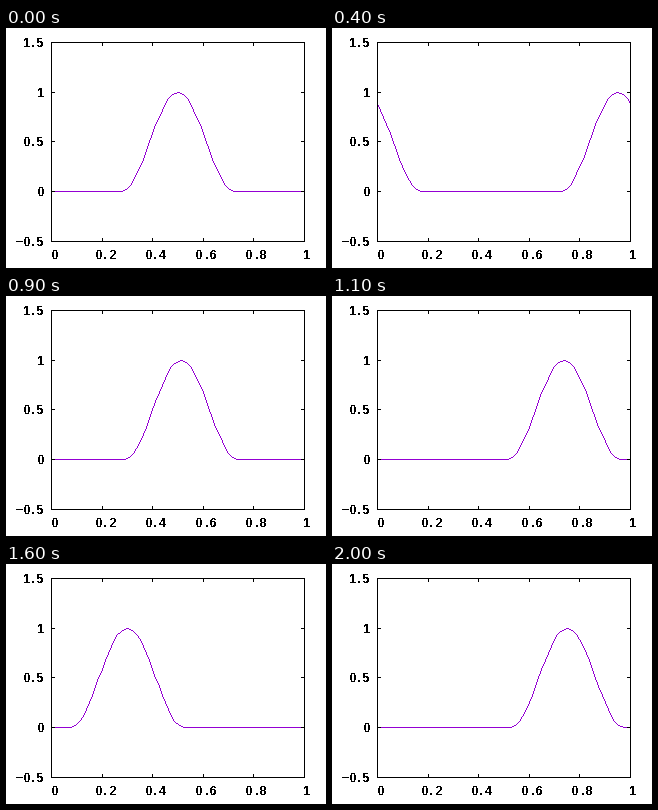
A matplotlib script that plays this animation: 320 by 240 pixels, repeating every 2.1 s.

```python
import numpy as np
import matplotlib.pyplot as plt
from matplotlib.animation import FuncAnimation
from matplotlib.collections import PolyCollection

plt.rcParams.update({
    "text.antialiased": False,
    "text.hinting_factor": 1,
    "font.family": "Liberation Sans",
})

W, H, DPI = 320, 240, 100
FRAMES, INTERVAL = 21, 100
LEFT, RIGHT, TOP, BOTTOM = 45, 298, 14, 213
TICK = 3
CELL = 7            # label character pitch
START, STEP, HALF = 0.5, 0.1125, 0.225

fig = plt.figure(figsize=(W / DPI, H / DPI), dpi=DPI, facecolor="white")
ax = fig.add_axes([0, 0, 1, 1])
ax.set_xlim(0, W)
ax.set_ylim(H, 0)
ax.axis("off")


def to_x(x):
    return np.floor(LEFT + x * (RIGHT - LEFT) + 0.5)


def to_y(y):
    return np.ceil(BOTTOM - (y + 0.5) / 2 * (BOTTOM - TOP) - 0.5)


def trace(xs, ys):
    """Unit squares along a one-pixel polyline without antialiasing."""
    squares = []
    corner = np.array([[0, 0], [1, 0], [1, 1], [0, 1]])
    for x0, y0, x1, y1 in zip(xs, ys, xs[1:], ys[1:]):
        n = int(max(abs(x1 - x0), abs(y1 - y0)))
        for t in np.linspace(0, 1, n + 1):
            px = np.floor(x0 + t * (x1 - x0) + 0.5)
            py = np.floor(y0 + t * (y1 - y0) + 0.5)
            squares.append(corner + [px, py])
    return squares


def line(xs, ys, color="black", z=3):
    art = PolyCollection(trace(xs, ys), facecolor=color, linewidth=0, zorder=z)
    return ax.add_collection(art, autolim=False)


def label(text, x, baseline):
    """Fixed-pitch label whose first cell starts at x."""
    for i, ch in enumerate(text):
        ax.text(x + CELL * (i + 0.5), baseline, ch, ha="center",
                va="baseline", fontsize=13 * 72 / DPI, weight="bold")


def pulse(x, center):
    d = (x - center + 0.5) % 1 - 0.5
    return np.where(abs(d) < HALF, np.cos(np.pi * d / (2 * HALF)) ** 2, 0)


line([LEFT, RIGHT, RIGHT, LEFT, LEFT], [TOP, TOP, BOTTOM, BOTTOM, TOP])

for v in np.arange(6) / 5:
    x, text = to_x(v), f"{v: g}"
    line([x, x], [TOP, TOP + TICK])
    line([x, x], [BOTTOM - TICK, BOTTOM])
    label(text, x - CELL * len(text) / 2, 231)

for v in np.arange(-1, 4) / 2:
    y, text = to_y(v), f"{v:g}".replace("-", "\u2212")
    line([LEFT, LEFT + TICK], [y, y])
    line([RIGHT - TICK, RIGHT], [y, y])
    label(text, 38 - CELL * len(text), y + 5)

grid = np.linspace(0, 1, 81)
curve = line(to_x(grid), to_y(pulse(grid, START)), "#9400d3", 2)


def update(i):
    curve.set_verts(trace(to_x(grid), to_y(pulse(grid, START + STEP * i))))
    return [curve]


anim = FuncAnimation(fig, update, frames=FRAMES, interval=INTERVAL,
                     repeat=True, repeat_delay=0)
plt.show()
```
